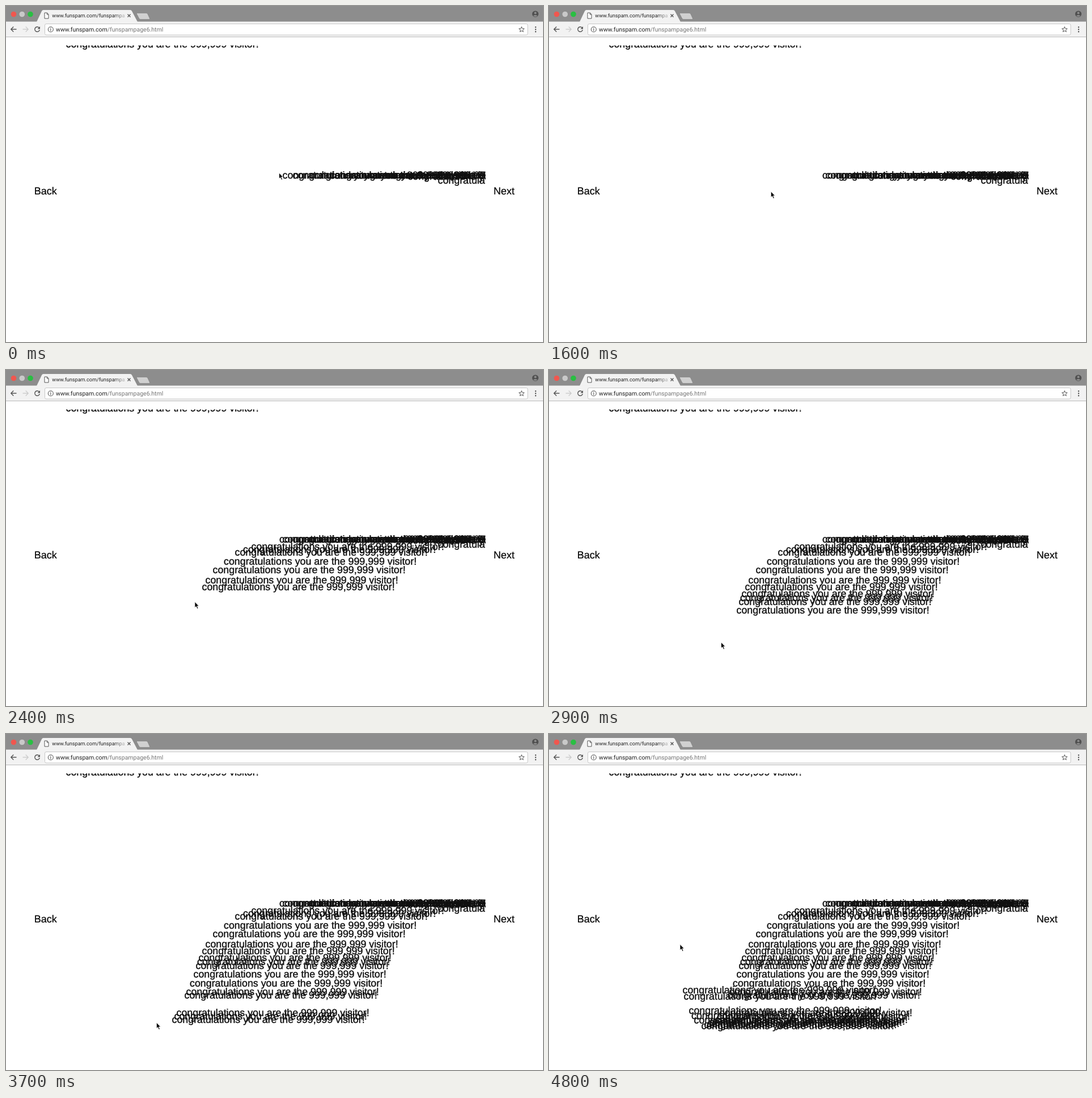
Recreate the animation shown at these times as an HTML page. Size 947 by 592 pixels, loop 4.9 s.

```html
<!DOCTYPE html>
<html lang="en">
<head>
<meta charset="utf-8">
<title>funspampage6</title>
<style>
  html, body { margin: 0; width: 100%; height: 100%; overflow: hidden; background: #fff; }
  svg { display: block; width: 947px; height: 592px; }
  text { white-space: pre; text-rendering: geometricPrecision; }
  .ui { font-family: Roboto, "Open Sans", sans-serif; fill: #222; }
  .page { font: 18px "Liberation Sans", Arial, sans-serif; fill: #000; stroke: #000; stroke-width: .2px; }
  .trail text {
    font: 17.8px "Liberation Sans", Arial, sans-serif;
    fill: #111; stroke: #111; stroke-width: .4px;
  }
  .line { fill: none; stroke: #555; stroke-width: 1.4; }
</style>
</head>
<body>
<svg viewBox="0 0 947 592" xmlns="http://www.w3.org/2000/svg">
  <defs>
    <clipPath id="area"><rect y="69.5" width="845.5" height="523"/></clipPath>
    <linearGradient id="fade" gradientUnits="userSpaceOnUse" x1="190" x2="211" y1="0" y2="0">
      <stop offset="0" stop-color="#222"/><stop offset="1" stop-color="#222" stop-opacity=".15"/>
    </linearGradient>
  </defs>
  <rect width="947" height="592" fill="#fff"/>

  <!-- tab strip -->
  <rect width="947" height="28" fill="#8d8d8d"/>
  <circle cx="13.5" cy="14.5" r="4.8" fill="#f0574f"/>
  <circle cx="28.3" cy="14.5" r="4.8" fill="#c9c9c9"/>
  <circle cx="43" cy="14.5" r="4.8" fill="#29bf42"/>
  <path d="M54 28L63 9Q64 7 66 7H219Q221 7 222 9L232 28Z" fill="#f2f2f2"/>
  <path d="M68 12h4.500l2.500 2.700v7.300h-7zM72.300 12v3h2.700" fill="#fff" stroke="#555"/>
  <text class="ui" x="81.300" y="20.300" font-size="9.1" style="fill:url(#fade)">www.funspam.com/funspampa</text>
  <path class="line" d="M214.500 14.500l5 5m0-5l-5 5"/>
  <path d="M231.500 12.500H247Q249 12.500 249.800 14L253.500 22Q254 23.500 252 23.500H237.500Q235.500 23.500 234.700 22L230.500 14Q230 12.500 231.500 12.500Z" fill="#d0d0d0" stroke="#7c7c7c" stroke-width=".6"/>
  <circle cx="933.500" cy="14" r="5.600" fill="#505050"/>
  <circle cx="933.500" cy="12.300" r="2" fill="#8d8d8d"/>
  <path d="M929.800 17.300q3.700-3 7.400 0q-3.700 3-7.400 0z" fill="#8d8d8d"/>

  <!-- toolbar -->
  <rect y="27.500" width="947" height="27.500" fill="#f2f2f2"/>
  <path d="M0 54.500H947" stroke="#b9b9b9"/>
  <path class="line" d="M18.500 41H9M13.300 36.500L8.800 41l4.500 4.500"/>
  <path class="line" style="stroke:#cdcdcd" d="M29.500 41H39M34.700 36.500L39.200 41l-4.500 4.500"/>
  <path class="line" d="M58.300 38.200A4.300 4.300 0 1 0 59.300 42"/>
  <path d="M60 36v4.500h-4.500z" fill="#555"/>
  <rect x="68.500" y="31.500" width="851.500" height="19.500" rx="2.500" fill="#fff" stroke="#c6c6c6"/>
  <circle class="line" cx="78.800" cy="41.200" r="4.500" style="stroke-width:1.1"/>
  <path d="M78.800 40.500v3.300M78.800 38.500v1.200" stroke="#555" stroke-width="1.2"/>
  <text class="ui" x="88" y="44.800" font-size="10.5">www.funspam.com<tspan fill="#777">/funspampage6.html</tspan></text>
  <path id="star" class="line" style="stroke-width:1"/>
  <path d="M934 37.200h0m0 4h0m0 4h0" stroke="#555" stroke-width="2.4" stroke-linecap="round"/>

  <!-- page -->
  <text class="page" x="49.8" y="332.2">Back</text>
  <text class="page" x="859.8" y="332.2">Next</text>
  <g class="trail" id="trail" clip-path="url(#area)"></g>
  <path id="cursor" d="M0 0V10.300L2.400 8.200L4.200 12.400L6 11.600L4.200 7.500H7.300Z" stroke="#fff" stroke-width=".8" stroke-linejoin="round"/>
</svg>
<script>
const LOOP = 4900, TICK = 100, LAG = 300, TRAIL = 28, OLD = 7;
const MESSAGE = "congratulations you are the 999,999 visitor!";
const $ = id => document.getElementById(id);

// mouse path: position along the trail (in messages), x, y
const PATH = [
  [0, 482.5, 298.5], [1, 433, 312], [3, 404, 322], [5, 365, 353], [6, 352, 371],
  [8, 340, 395], [10, 335, 409], [11, 331, 424], [13, 318, 455], [14, 315, 461],
  [15, 301, 492], [17, 293, 504], [22, 269, 515], [23, 256, 505], [25, 247, 488],
  [26, 238, 463], [27, 236, 452], [28, 229, 433], [29, 228, 396], [30, 232, 375]
];
// mouse pace: time, position along the trail
const PACE = [
  [1100, 0], [1500, 1.8], [1600, 3.6], [1800, 5.1], [2100, 7.8], [2600, 11.9],
  [2900, 14.75], [3400, 17.7], [3700, 22.2], [4100, 22.8], [4400, 28], [4800, 30]
];
// stretches in which the screen refreshes; it holds still in between
const LIVE = [
  [0, 0], [1100, 1800], [2000, 2100], [2400, 2400], [2700, 3000],
  [3200, 3400], [3700, 4000], [4400, 4400], [4600, 4600], [4800, 4800]
];

// linear interpolation in rows of [key, ...values]
function along(rows, key) {
  const i = rows.findIndex(row => row[0] > key);
  if (i === 0) return rows[0].slice(1);
  if (i < 0) return rows.at(-1).slice(1);
  const a = rows[i - 1], b = rows[i];
  const f = (key - a[0]) / (b[0] - a[0]);
  return a.slice(1).map((v, j) => v + (b[j + 1] - v) * f);
}
const place = t => along(PACE, t)[0];

function stamp(x, mid) {
  const el = document.createElementNS("http://www.w3.org/2000/svg", "text");
  el.setAttribute("x", x - 0.4);
  el.setAttribute("y", mid + 5.4);
  el.textContent = MESSAGE;
  return $("trail").appendChild(el);
}

// messages left before the loop begins, slowing down towards the mouse
stamp(106, 67.5);
for (let i = OLD; i >= 0; i--) {
  const u = i / OLD;
  stamp(488 + 274 * u ** 1.4, 298.5 + 9.5 * u ** 9);
}
const trail = Array.from({ length: TRAIL }, (_, i) => stamp(...along(PATH, i)));

const starPoints = Array.from({ length: 10 }, (_, i) => {
  const r = i % 2 ? 2.2 : 5, a = i * Math.PI / 5;
  return `${909.3 + r * Math.sin(a)} ${41.5 - r * Math.cos(a)}`;
});
$("star").setAttribute("d", "M" + starPoints.join("L") + "Z");

function refreshTime(t) {
  const [first, last] = LIVE.findLast(run => run[0] <= t);
  return Math.max(first, Math.min(last, Math.floor(t / TICK) * TICK));
}

let shown = -1;
function draw(now) {
  const t = refreshTime(now % LOOP);
  if (t === shown) return;
  shown = t;
  const [x, y] = along(PATH, place(t));
  $("cursor").setAttribute("transform", `translate(${x - 1} ${y - 4.5})`);
  const done = place(t - LAG);
  trail.forEach((el, i) => el.style.display = done > 0 && i <= done ? "" : "none");
}

const start = performance.now();
function frame() {
  draw(performance.now() - start);
  requestAnimationFrame(frame);
}
frame();
</script>
</body>
</html>
```
